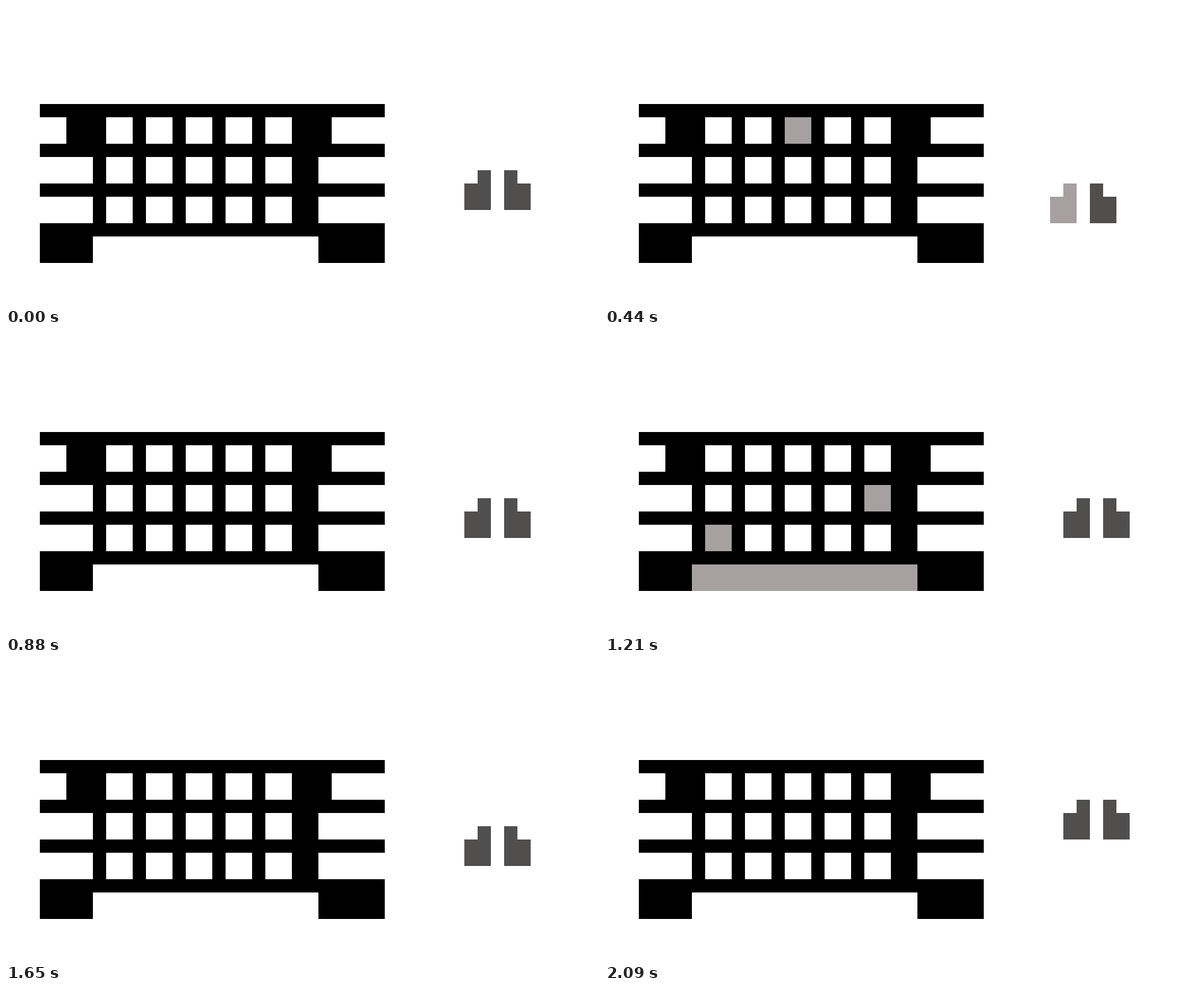
Animation, 894 px wide and 453 px high, one loop 2.2 s. Source, as an HTML page with a canvas:

```html
<!DOCTYPE html>
<html lang="en">
<head>
<meta charset="utf-8">
<title>Keyboard and mouse</title>
<style>
  html, body { margin: 0; width: 100%; height: 100%; overflow: hidden; background: #fff; }
  canvas { display: block; }
</style>
</head>
<body>
<canvas id="stage" width="894" height="453"></canvas>
<script>
const ctx = document.getElementById('stage').getContext('2d');
const STEP = 110;
const DARK = '#504f4d', LIGHT = '#a6a0a0';
const HOME = [691, 248], LOW = [671, 268], LOWER = [671, 288];
const HIGH = [691, 208], OUT = [731, 208];

// Each step: mouse position, clicked button, pressed keys (row + column; L = left edge key)
const steps = [
  [HOME, '', []],
  [HOME, '', ['00']],
  [LOW, '', []],
  [LOWER, '', ['03']],
  [LOW, 'left', ['02']],
  [HOME, '', []],
  [HOME, '', ['11', 'space']],
  [HOME, 'left', ['23']],
  [HOME, '', []],
  [HOME, 'right', ['12', 'space']],
  [HOME, '', []],
  [HOME, '', ['14', '20', 'space']],
  [HOME, '', ['1L', '02']],
  [HOME, '', []],
  [HOME, '', ['01', 'space']],
  [HOME, '', []],
  [HIGH, 'left', ['03', 'space']],
  [HIGH, '', []],
  [OUT, '', ['01']],
  [HIGH, '', []]
];

function box(color, x, y, w, h) {
  ctx.fillStyle = color;
  ctx.fillRect(x, y, w, h);
}

function drawKeyboard(pressed) {
  const key = (id, x, y, w) => box(pressed.includes(id) ? LIGHT : '#fff', x, y, w, 40);
  box('#000', 51, 148, 520, 240);
  for (let row = 0; row < 3; row++) {
    const y = 168 + row * 60;
    const right = row ? 471 : 491;
    key(row + 'L', 51, y, row ? 80 : 40);
    for (let col = 0; col < 5; col++) key(`${row}${col}`, 151 + col * 60, y, 40);
    key(row + 'R', right, y, 571 - right);
  }
  key('space', 131, 348, 340);
}

function drawMouse([x, y], click) {
  const left = click === 'left' ? LIGHT : DARK;
  const right = click === 'right' ? LIGHT : DARK;
  box(left, x + 20, y, 20, 20);
  box(left, x, y + 20, 40, 40);
  box(right, x + 60, y, 20, 20);
  box(right, x + 60, y + 20, 40, 40);
}

function draw(time) {
  const [place, click, pressed] = steps[Math.floor(time / STEP) % steps.length];
  box('#fff', 0, 0, 894, 453);
  drawKeyboard(pressed);
  drawMouse(place, click);
}

const start = performance.now();
function tick() {
  draw(performance.now() - start);
  requestAnimationFrame(tick);
}
tick();
</script>
</body>
</html>
```
